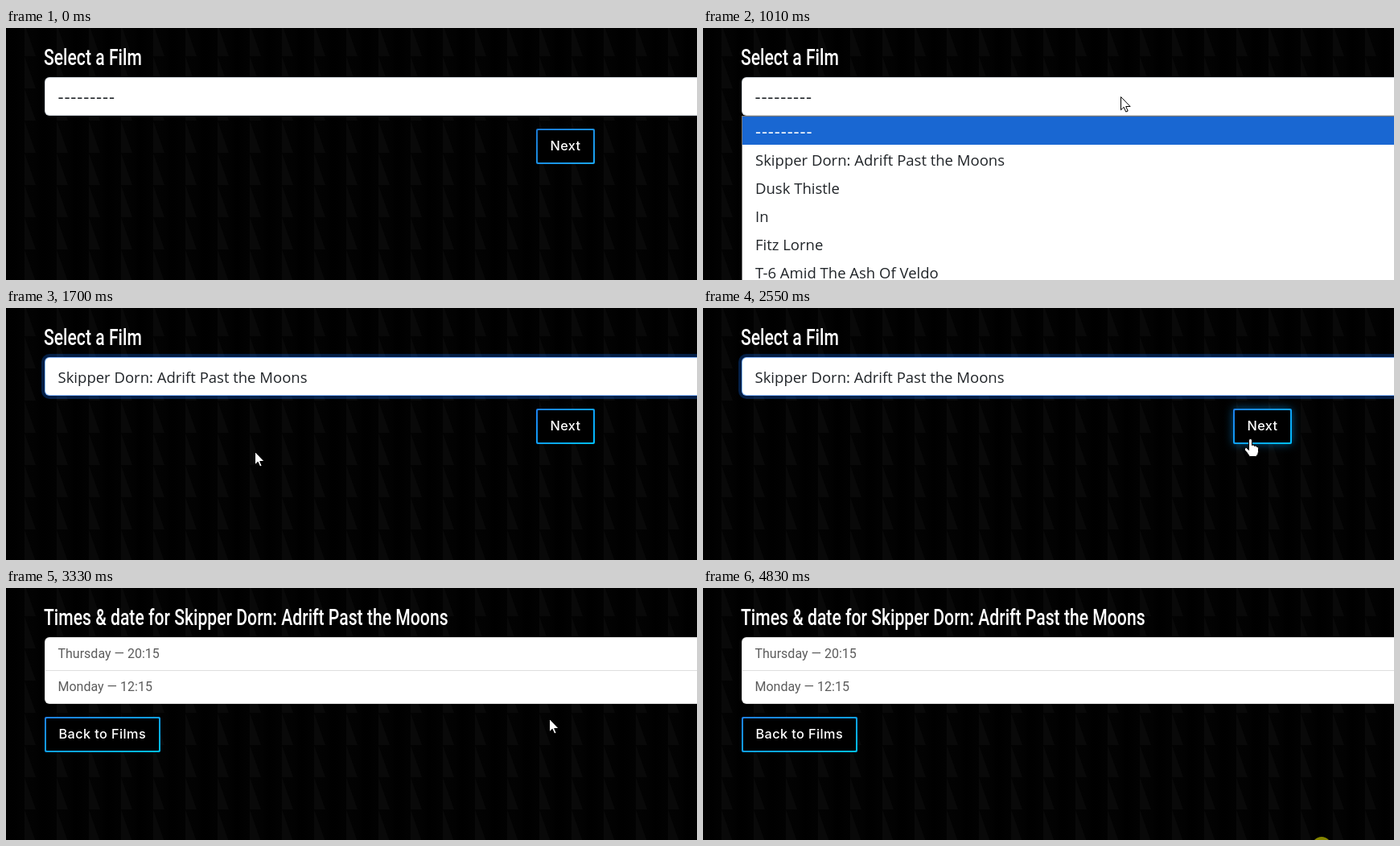
These frames come from a looping animation (859x313 px, 4.89 s). An HTML page with a canvas:

```html
<!DOCTYPE html>
<html lang="en">
<head>
<meta charset="utf-8">
<title>Select a Film</title>
<style>
  html, body { margin: 0; width: 100%; height: 100%; overflow: hidden; background: #000; }
  canvas { display: block; }
</style>
</head>
<body>
<canvas id="stage" width="859" height="313"></canvas>
<script>
const W = 859, H = 313, LOOP = 4890;
const ctx = document.getElementById('stage').getContext('2d');

const FILM = 'Skipper Dorn: Adrift Past the Moons';
const DASHES = '---------';
const OPTIONS = [DASHES, FILM, 'Dusk Thistle', 'In', 'Fitz Lorne', 'T-6 Amid The Ash Of Veldo'];
const UI = '18.5px "Open Sans", "Noto Sans", sans-serif';
const DASH = '22px "Open Sans", "Noto Sans", sans-serif';
const INK = '#212529';

// Pointer stops: time, x, y; each leg is eased.
const PATH = [
  [240, 790, 312], [620, 531, 64], [790, 531, 64], [960, 521, 86], [1000, 521, 86],
  [1300, 313, 169], [1380, 310, 179], [1860, 310, 179], [2370, 645, 174],
  [2460, 680, 163], [2700, 680, 163], [2760, 676, 163], [3830, 676, 163], [4370, 791, 313]
];
// Mouse presses: from, to, x, y.
const CLICKS = [[940, 1010, 521, 86], [1640, 1700, 309, 180], [2720, 2800, 676, 163], [4830, LOOP, 769, 321]];

const clamp = v => Math.max(0, Math.min(1, v));
const ramp = (t, from, to) => clamp((t - from) / (to - from));
const smooth = p => p * p * (3 - 2 * p);

function makeBackdrop() {
  const tile = document.createElement('canvas');
  tile.width = tile.height = 40;
  const g = tile.getContext('2d');
  const stripe = g.createLinearGradient(0, 0, 40, 0);
  stripe.addColorStop(0, '#030303');
  stripe.addColorStop(0.35, '#020202');
  stripe.addColorStop(0.6, '#000');
  stripe.addColorStop(1, '#020202');
  g.fillStyle = stripe;
  g.fillRect(0, 0, 40, 40);
  g.fillStyle = '#090909';
  g.beginPath();
  g.moveTo(0, 0);
  g.lineTo(14, 40);
  g.lineTo(0, 40);
  g.fill();
  const pattern = ctx.createPattern(tile, 'repeat');
  pattern.setTransform(new DOMMatrix().translate(23, 35));
  return pattern;
}
const backdrop = makeBackdrop();

function text(str, x, y, font, color, spacing = 0) {
  ctx.font = font;
  ctx.letterSpacing = spacing + 'px';
  ctx.fillStyle = color;
  ctx.fillText(str, x, y);
}

function uiText(str, x, y, color) {
  if (str === DASHES) text(str, x, y, DASH, color, 0.85);
  else text(str, x, y, UI, color);
}

// Condensed heading face
function heading(str) {
  ctx.save();
  ctx.translate(47, 46);
  ctx.scale(0.755, 1);
  text(str, 0, 0, '500 28px Roboto, sans-serif', '#fff');
  ctx.restore();
}

function box(x, y, w, h, r, fill) {
  ctx.fillStyle = fill;
  ctx.beginPath();
  ctx.roundRect(x, y, w, h, r);
  ctx.fill();
}

// Corner-to-corner gradient whose middle colour meets the other two corners.
function cornerGradient(x, y, w, h, from, to) {
  const k = w * h / (w * w + h * h), cx = x + w / 2, cy = y + h / 2;
  const g = ctx.createLinearGradient(cx - h * k, cy - w * k, cx + h * k, cy + w * k);
  g.addColorStop(0, from);
  g.addColorStop(1, to);
  return g;
}

function button(label, x, y, w, bright, glow) {
  const edge = bright
    ? cornerGradient(x, y, w, 44, '#1e80ee', '#00bfff')
    : cornerGradient(x, y, w, 44, '#1b78d0', '#1aa6f5');
  ctx.save();
  ctx.shadowColor = `rgba(0,160,255,${0.6 * glow})`;
  ctx.shadowBlur = 12 * glow;
  box(x, y, w, 44, 2, edge);
  ctx.restore();
  box(x + 2, y + 2, w - 4, 40, 1, '#000');
  text(label, x + 17.5, y + 27, '500 16.3px Inter, sans-serif', '#fff', 0.4);
}

function selectBox(value, focus) {
  if (focus) box(44, 57, W, 56, 10, `rgba(13,110,253,${0.27 * focus})`);
  box(48, 61, W, 48, 6, focus > 0.5 ? '#86b7fe' : '#ced4da');
  box(49, 62, W, 46, 5, '#fff');
  uiText(value, 64.5, 93, INK);
}

function dropdown(active) {
  ctx.fillStyle = '#fff';
  ctx.fillRect(48, 109, W, H);
  ctx.fillStyle = '#767676';
  ctx.fillRect(48, 109, 1, H);
  ctx.fillRect(48, 109, W, 1);
  ctx.fillStyle = '#1967d2';
  ctx.fillRect(49, 110 + active * 35, W, 35);
  OPTIONS.forEach((name, i) => {
    const color = i === active ? '#fff' : i === 0 ? '#245093' : INK;
    uiText(name, 65, 136 + i * 35, color);
  });
}

function formPage(t, pointerY) {
  const open = t >= 1010 && t < 1700;
  const focus = ramp(t, 1020, 1170) * (1 - ramp(t, 2740, 2900));
  heading('Select a Film');
  if (!open) {
    const glow = smooth(ramp(t, 2390, 2600));
    button('Next', 659, 125, 73, t >= 1700, glow);
  }
  selectBox(t < 1700 ? DASHES : FILM, focus);
  if (open) dropdown(pointerY > 145 ? 1 : 0);
}

function timesPage() {
  const font = '16px Roboto, sans-serif';
  heading('Times & date for ' + FILM);
  box(48, 61, W, 83, 6, '#dfdfdf');
  box(49, 62, W, 81, 5, '#fff');
  ctx.fillStyle = '#dfdfdf';
  ctx.fillRect(49, 102, W, 1);
  text('Thursday — 20:15', 64.5, 87, font, '#5c5c5c');
  text('Monday — 12:15', 64.5, 128, font, '#5c5c5c');
  button('Back to Films', 48, 160, 144, true, 0);
}

function pointerAt(t) {
  if (t < PATH[0][0] || t >= PATH.at(-1)[0]) return null;
  const i = PATH.findIndex(stop => stop[0] > t);
  const [t0, x0, y0] = PATH[i - 1], [t1, x1, y1] = PATH[i];
  const p = smooth(ramp(t, t0, t1));
  return { x: x0 + (x1 - x0) * p, y: y0 + (y1 - y0) * p };
}

const arrow = new Path2D('M0 0V16.3L3.7 12.8L6.2 18.6L8.7 17.6L6.2 12H11.6Z');
const hand = new Path2D('M-1 1Q1-1 3 1V8Q5 6 6 9Q8 7 9 10Q11 9 11 12V16Q11 19 8 22H0Q-3 17-6 14Q-7 11-4 11L-1 14Z');

function drawPointer({ x, y }, shape) {
  ctx.save();
  ctx.translate(Math.round(x) - 0.5, Math.round(y) - 0.5);
  ctx.lineJoin = 'round';
  ctx.lineWidth = 1;
  ctx.fillStyle = '#fff';
  ctx.strokeStyle = '#000';
  ctx.fill(shape);
  ctx.stroke(shape);
  ctx.restore();
}

function draw(t) {
  const pointer = pointerAt(t);
  ctx.fillStyle = backdrop;
  ctx.fillRect(0, 0, W, H);
  if (t < 3330) formPage(t, pointer ? pointer.y : 0);
  else timesPage();

  for (const [from, to, x, y] of CLICKS) {
    if (t < from || t >= to) continue;
    ctx.fillStyle = 'rgba(255,255,0,0.52)';
    ctx.beginPath();
    ctx.arc(x, y, 12, 0, Math.PI * 2);
    ctx.fill();
  }
  if (pointer) drawPointer(pointer, t >= 2400 && t < 2920 ? hand : arrow);
}

const start = performance.now();
function tick() {
  draw((performance.now() - start) % LOOP);
  requestAnimationFrame(tick);
}
tick();
</script>
</body>
</html>
```
